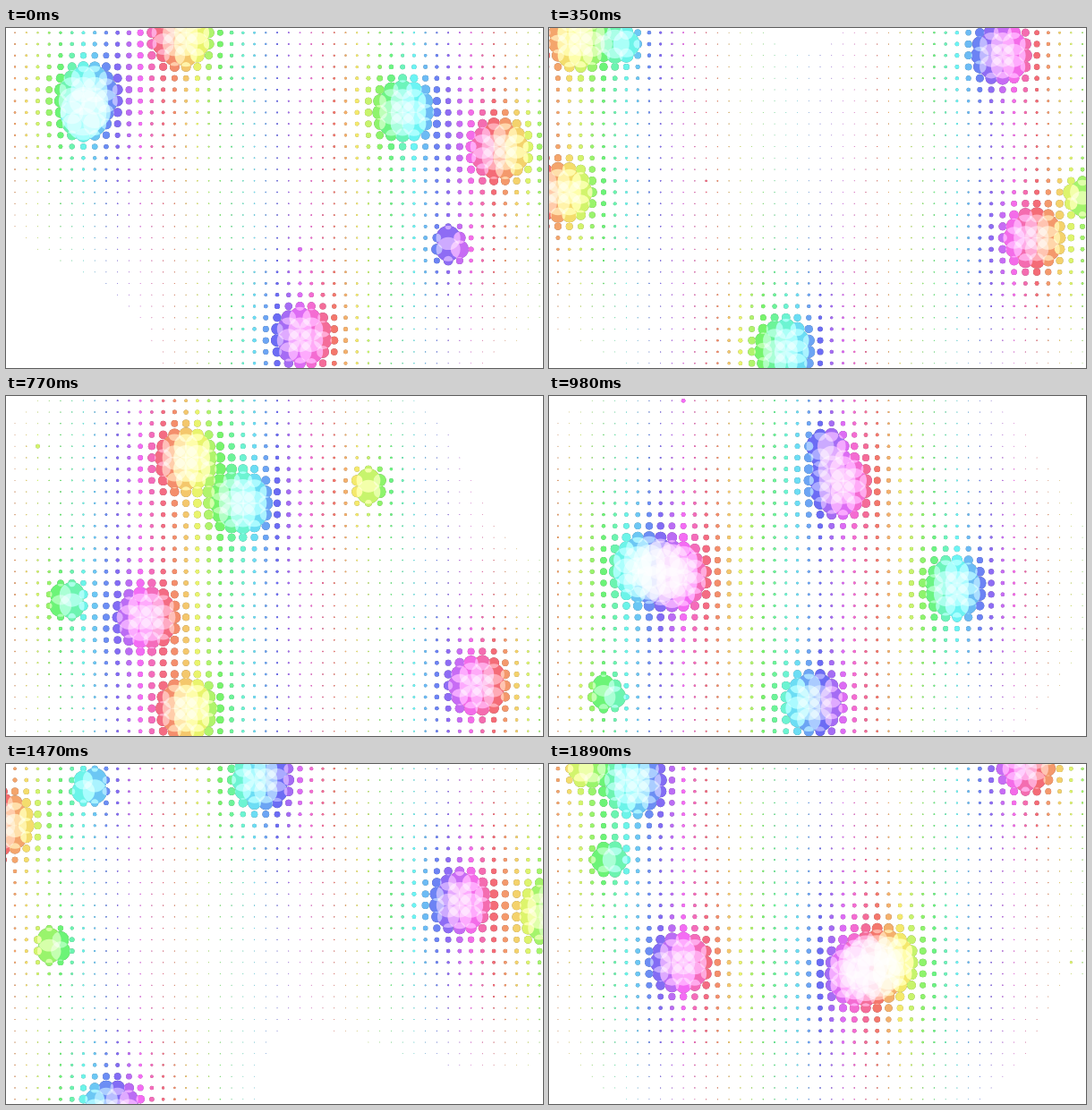
An HTML page with a canvas that plays this animation: 600x380 px, repeating every 1.96 s.

```html
<!DOCTYPE html>
<html lang="en">
<head>
<meta charset="utf-8">
<title>Dot field</title>
<style>
html, body { margin: 0; width: 100%; height: 100%; overflow: hidden; background: #fff; }
canvas { display: block; }
</style>
</head>
<body>
<canvas id="stage" width="600" height="380"></canvas>
<script>
const W = 600, H = 380, STEP = 70, STEPS = 28;
const GAP = 12.74, LEFT = 10, TOP = 5.2, EDGE = 8, MIN_R = 0.39;
const BIG = 5400, SMALL = 1200, TINY = 20;

// Each ball flies straight and bounces off the walls; start points may lie
// beyond a wall, fold() mirrors them back on stage.
const ball = (mass, x, y, vx, vy) => ({ mass, x, y, vx, vy });
const BALLS = [
  ball(BIG, -107, 701, 29.25, -26.06),
  ball(BIG, 331, 431, -16.41, -17.36),
  ball(BIG, -212, -26, 39.03, 9.14),
  ball(BIG, 664, -152, -38, 25.67),
  ball(BIG, 772, 684, -23.16, -34.15),
  ball(SMALL, 87, 896, -1.68, -32.98),
  ball(SMALL, 720, -260, -29.77, 13.58),
  ball(TINY, 332, 249, -36.17, -17.97)
];

const ctx = document.getElementById('stage').getContext('2d');
const layer = document.createElement('canvas');
layer.width = W;
layer.height = H;
const glow = layer.getContext('2d');

function fold(v, size) {
  const span = size + 2 * EDGE, loop = 2 * span;
  const u = (((v + EDGE) % loop) + loop) % loop;
  return Math.min(u, loop - u) - EDGE;
}

// Flight time: falls behind at the start, then catches up.
function flight(n) {
  return n - Math.max(0, Math.min(n / 6, (18 - n) / 16));
}

function disc(c, x, y, r, color) {
  c.fillStyle = color;
  c.beginPath();
  c.arc(x, y, r, 0, 2 * Math.PI);
  c.fill();
}

function draw(n) {
  const t = flight(n);
  const balls = BALLS.map(b => ({
    mass: b.mass, x: fold(b.x + b.vx * t, W), y: fold(b.y + b.vy * t, H)
  }));
  const pull = (b, x, y) =>
    Math.min(GAP, b.mass / ((x - b.x) ** 2 + (y - b.y) ** 2));

  ctx.fillStyle = '#fff';
  ctx.fillRect(0, 0, W, H);
  glow.clearRect(0, 0, W, H);
  glow.globalCompositeOperation = 'screen';

  for (let i = -1; i <= 47; i++) {
    const x = LEFT + i * GAP, hue = (25 + 25 * i) % 360;
    for (let j = -1; j <= 30; j++) {
      const y = TOP + j * GAP;
      const r = balls.reduce((sum, b) => sum + pull(b, x, y), 0);
      if (r < MIN_R) continue;
      disc(ctx, x, y, r, `hsl(${hue}, 35%, 40%)`);  // thin dark rim
      disc(glow, x, y, r, `hsl(${hue}, 86%, 69%)`);
    }
  }
  ctx.drawImage(layer, 0, 0);
}

const start = performance.now();
let shown = -1;
function tick() {
  const n = Math.floor((performance.now() - start) / STEP) % STEPS;
  if (n !== shown) draw(shown = n);
  requestAnimationFrame(tick);
}
tick();
</script>
</body>
</html>
```
